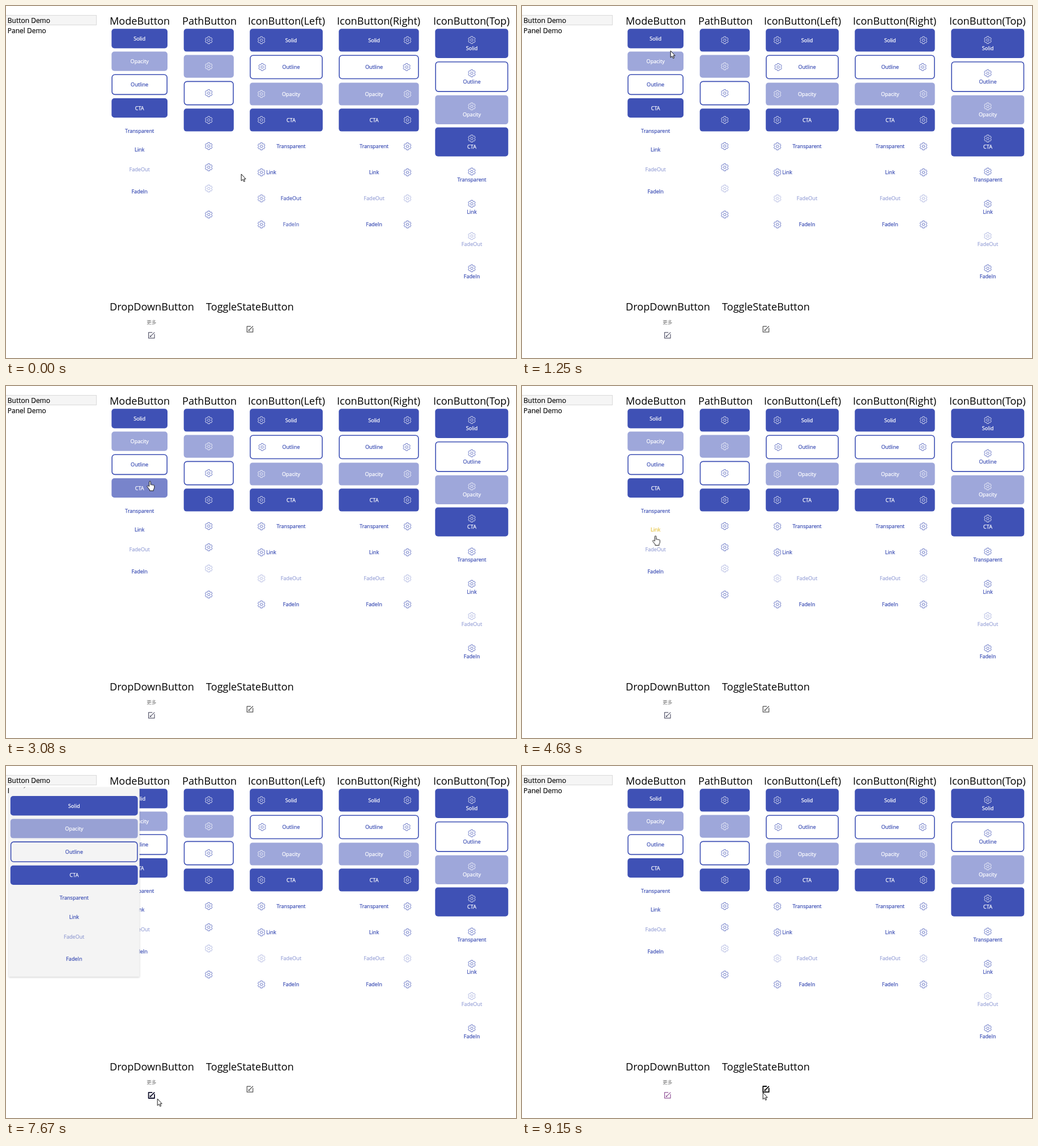
Recreate the animation shown at these times as an HTML page. Size 900 by 622 pixels, loop 9.53 s.

```html
<!DOCTYPE html>
<html lang="en">
<head>
<meta charset="utf-8">
<title>Button demo</title>
<style>
  html, body { margin: 0; width: 100%; height: 100%; overflow: hidden; background: #fff; }
  svg { display: block; font: 9.1px "Open Sans", "Noto Sans", sans-serif; }
  .label { text-anchor: middle; fill: currentColor; stroke: currentColor; stroke-width: .25; }
  .heading { font-size: 18.1px; }
  .item { font-size: 12px; stroke: #000; stroke-width: .15; }
  .more { font: 8.5px "Noto Sans CJK SC", "Noto Sans CJK", sans-serif; text-anchor: middle; fill: #777; }
  .gear { fill: none; stroke-width: .75; stroke-linejoin: round; }
  .edit { fill: none; stroke-width: 1.25; stroke-linejoin: round; }
  .popup { filter: drop-shadow(0 1px 1.5px #0003); }
  .cursor path { fill: #fff; stroke: #111; stroke-width: 1; stroke-linejoin: round; }
</style>
</head>
<body>
<svg id="stage" width="900" height="622" viewBox="0 0 900 622"></svg>
<script>
const LOOP = 9530, INDIGO = '#3f51b5', WHITE = '#fff', FADED = .5;
const stage = document.getElementById('stage');
const sheet = [];

function add(parent, tag, attrs = {}, text = '') {
  const el = document.createElementNS('http://www.w3.org/2000/svg', tag);
  for (const key in attrs) el.setAttribute(key, attrs[key]);
  el.textContent = text;
  parent.append(el);
  return el;
}

// Turns [ms, value] pairs into a looping CSS animation.
function track(el, prop, keys, easing = 'linear') {
  const name = 'track' + sheet.length;
  const all = [[0, keys[0][1]], ...keys, [LOOP, keys.at(-1)[1]]];
  const steps = all.map(([ms, value]) => `${(ms / LOOP * 100).toFixed(3)}% { ${prop}: ${value} }`);
  sheet.push(`@keyframes ${name} { ${steps.join(' ')} }`);
  const old = el.style.animation;
  el.style.animation = (old ? old + ', ' : '') + `${name} ${LOOP}ms ${easing} infinite`;
}

function hover(el, prop, rest, hot, [on, full, off, done]) {
  track(el, prop, [[on, rest], [full, hot], [off, hot], [done, rest]]);
}

function box(parent, kind, x, y, w, h) {
  const outline = kind === 'Outline', inset = outline ? .8 : 0;
  return add(parent, 'rect', {
    x: x + inset, y: y + inset, width: w - 2 * inset, height: h - 2 * inset, rx: 5,
    fill: outline ? WHITE : INDIGO, stroke: outline ? INDIGO : 'none', 'stroke-width': 1.6,
    'fill-opacity': kind === 'Opacity' ? FADED : 1
  });
}

const inkOf = kind => ['Solid', 'Opacity', 'CTA'].includes(kind) ? WHITE : INDIGO;
const fadeOf = kind => kind === 'FadeOut' ? FADED : 1;

function label(parent, kind, x, y) {
  return add(parent, 'text', { class: 'label', x, y: y + 3.4, color: inkOf(kind), opacity: fadeOf(kind) }, kind);
}

// Six-toothed outline with a ring in the middle.
const gearPath = (() => {
  const points = [];
  for (let tooth = 0; tooth < 6; tooth++)
    for (const [deg, r] of [[-22, 4.9], [-15, 6.5], [15, 6.5], [22, 4.9]]) {
      const a = (tooth * 60 + deg - 90) * Math.PI / 180;
      points.push((r * Math.cos(a)).toFixed(2) + ' ' + (r * Math.sin(a)).toFixed(2));
    }
  return `M${points.join('L')}ZM2.2 0A2.2 2.2 0 1 0 -2.2 0A2.2 2.2 0 1 0 2.2 0Z`;
})();

function gear(parent, kind, x, y) {
  return add(parent, 'path', {
    class: 'gear', d: gearPath, transform: `translate(${x} ${y})`, stroke: inkOf(kind), opacity: fadeOf(kind)
  });
}

function editIcon(x, y, stroke) {
  return add(stage, 'path', {
    class: 'edit', d: 'M1.5 -5H-5.2V5.2H5.2V-2M-2.4 2.6L5.4 -5.2M-2.4 2.6V.8M-2.4 2.6H-.6',
    transform: `translate(${x} ${y})`, stroke
  });
}

// Text-only buttons, shared by the page and the popup.
function modeColumn(parent, x, w, dy) {
  const rows = [
    ['Solid', 40.3, 34.4], ['Opacity', 80.6, 34.2], ['Outline', 120.5, 36.7], ['CTA', 163, 34.2],
    ['Transparent', 203, 34.2], ['Link', 254], ['FadeOut', 288.3], ['FadeIn', 328]
  ];
  const parts = {};
  for (const [kind, y, h] of rows) {
    const part = parts[kind] = {};
    if (h) part.box = box(parent, kind, x, y + dy, w, h);
    if (kind === 'Transparent') part.box.setAttribute('fill-opacity', 0);
    part.label = label(parent, kind, x + w / 2, y + dy + (h || 0) / 2);
  }
  return parts;
}

// Sidebar and headings
add(stage, 'rect', { x: -1, y: 16.5, width: 160.5, height: 17, fill: '#f5f5f5', stroke: '#dadada' });
add(stage, 'text', { class: 'item', x: 2.8, y: 29.7 }, 'Button Demo');
add(stage, 'text', { class: 'item', x: 2.8, y: 47.7 }, 'Panel Demo');
for (const [x, y, text] of [
  [183, 33, 'ModeButton'], [311, 33, 'PathButton'], [427, 33, 'IconButton(Left)'],
  [584, 33, 'IconButton(Right)'], [754, 33, 'IconButton(Top)'],
  [183, 538, 'DropDownButton'], [353, 538, 'ToggleStateButton']
]) add(stage, 'text', { class: 'heading', x, y }, text);

const mode = modeColumn(stage, 186.3, 98.7, 0);

// Icon-only column
for (const [kind, y, h] of [
  ['Solid', 40.3, 40.3], ['Opacity', 86.5, 40.2], ['Outline', 132.6, 42.8], ['CTA', 181.3, 40.3],
  ['Transparent', 247.5], ['Link', 285], ['FadeOut', 322.5], ['FadeIn', 368.5]
]) {
  if (h) box(stage, kind, 313.7, y, 88.2, h);
  gear(stage, kind, 357.8, y + (h || 0) / 2);
}

// Icon beside text
const left = {};
for (const [kind, y, h] of [
  ['Solid', 40.3, 40.3], ['Outline', 86.5, 42.8], ['Opacity', 135.4, 40.2], ['CTA', 181.3, 40.3],
  ['Transparent', 248], ['Link', 294], ['FadeOut', 340], ['FadeIn', 386]
]) {
  const cy = y + (h || 0) / 2, shift = kind === 'Outline' ? 1.4 : 0;
  if (h) {
    box(stage, kind, 430.2, y, 128.7, h);
    box(stage, kind, 587.3, y, 141.3, h);
  }
  left[kind] = {
    gear: gear(stage, kind, 450.7 + shift, cy),
    label: label(stage, kind, kind === 'Link' ? 468 : 503, cy)
  };
  gear(stage, kind, 708.5 - shift, cy);
  label(stage, kind, 649.5, cy);
}

// Icon above text
for (const [kind, y, h] of [
  ['Solid', 40.3, 51.6], ['Outline', 97.9, 54], ['Opacity', 157.7, 51.4], ['CTA', 214.6, 51.2],
  ['Transparent', 298.5], ['Link', 355.5], ['FadeOut', 412.5], ['FadeIn', 469.5]
]) {
  const cy = y + (h || 0) / 2;
  if (h) box(stage, kind, 757.3, y, 129, h);
  gear(stage, kind, 822, cy - 6);
  label(stage, kind, 822, cy + 8.2);
}

add(stage, 'text', { class: 'more', x: 256.7, y: 562.3 }, '更多');
const dropIcon = editIcon(256.8, 581.8, '#5c5c70');
const toggleIcon = editIcon(430.5, 571, '#555');

// Popup
const popup = add(stage, 'g', { class: 'popup' });
add(popup, 'rect', { x: 5, y: 38, width: 230.6, height: 334.5, fill: '#f4f4f4' });
add(popup, 'path', { d: 'M31.5 39.2L33.5 37.2', stroke: '#555' });
modeColumn(popup, 7.8, 224.8, 12.8).Outline.box.setAttribute('fill', '#f4f4f4');

// Cursor
const cursor = add(stage, 'g', { class: 'cursor' });
const arrow = add(cursor, 'path', { d: 'M.2 0V12L2.9 9.5 4.8 13.5 6.6 12.7 4.8 8.8H8.2Z' });
const hand = add(cursor, 'path', {
  d: 'M-1.3 9V1.2a1.3 1.3 0 0 1 2.6 0V6.2a1.2 1.2 0 0 1 2.3 .3a1.2 1.2 0 0 1 2.2 .5' +
     'a1.1 1.1 0 0 1 2 .6V11.5L6.3 14.5V16.5H-.5V15L-4.6 9.6a1.2 1.2 0 0 1 1.8 -1.6Z'
});

const stops = [
  [0, 415, 297], [70, 412, 291], [640, 268, 72], [840, 262, 60], [1249, 262, 60], [1250, 262, 79],
  [1530, 260, 93], [1860, 260, 94], [2230, 257, 134], [2630, 257, 135], [2920, 254, 168], [3230, 254, 169],
  [3620, 248, 213], [3920, 248, 214], [4320, 236, 262], [4629, 236, 262], [4630, 235.5, 265],
  [4940, 236, 285], [5260, 236, 286], [5810, 237, 321], [6039, 237, 321], [6040, 240.5, 380],
  [6420, 254, 556], [6640, 259, 581], [6970, 267, 588], [7670, 267, 588], [7860, 284, 593],
  [8300, 370, 585], [8600, 417, 575], [8690, 418, 575], [8830, 425, 577], [LOOP - 1, 425, 577]
];
track(cursor, 'transform', stops.map(([ms, x, y]) => [ms, `translate(${x}px, ${y}px)`]));
const handOn = [[0, 0], [640, 1], [1250, 0], [1320, 1], [6040, 0]];
track(hand, 'opacity', handOn, 'step-end');
track(arrow, 'opacity', handOn.map(([ms, on]) => [ms, 1 - on]), 'step-end');

// Hover states: start, full, leave, back at rest
hover(mode.Solid.box, 'fill-opacity', 1, .7, [640, 840, 1249, 1250]);
hover(mode.Opacity.box, 'fill-opacity', FADED, 1, [1320, 1530, 1860, 2000]);
hover(mode.Outline.box, 'fill', WHITE, INDIGO, [1980, 2230, 2630, 2760]);
hover(mode.Outline.label, 'color', INDIGO, WHITE, [1980, 2230, 2630, 2760]);
hover(mode.CTA.box, 'fill-opacity', 1, .7, [2720, 2920, 3230, 3370]);
hover(mode.Transparent.box, 'fill-opacity', 0, .12, [3400, 3620, 3920, 4060]);
hover(mode.Link.label, 'color', INDIGO, '#e6c545', [4080, 4320, 4660, 4800]);
hover(mode.FadeOut.label, 'opacity', FADED, 1, [4720, 4940, 5260, 5520]);
hover(mode.FadeIn.label, 'opacity', 1, FADED, [5480, 5810, 6070, 6320]);

for (const part of [left.FadeOut.gear, left.FadeOut.label]) track(part, 'opacity', [[70, .9], [400, FADED]]);
track(left.FadeIn.label, 'opacity', [[70, .82], [300, 1]]);

track(popup, 'opacity', [[6620, 0], [6800, 1], [7740, 1], [7880, 0]]);
track(dropIcon, 'stroke', [[6560, '#5c5c70'], [6700, '#14142e'], [7720, '#14142e'], [7950, '#94589a']]);
hover(dropIcon, 'stroke-width', 1.25, 1.8, [6560, 6700, 7720, 7950]);
track(toggleIcon, 'stroke', [[8690, '#555'], [8830, '#0a0a0a'], [LOOP - 1, '#0a0a0a']]);
track(toggleIcon, 'stroke-width', [[8690, 1.25], [8830, 1.8], [LOOP - 1, 1.8]]);

const style = document.createElement('style');
style.textContent = sheet.join('\n');
document.head.append(style);
</script>
</body>
</html>
```
